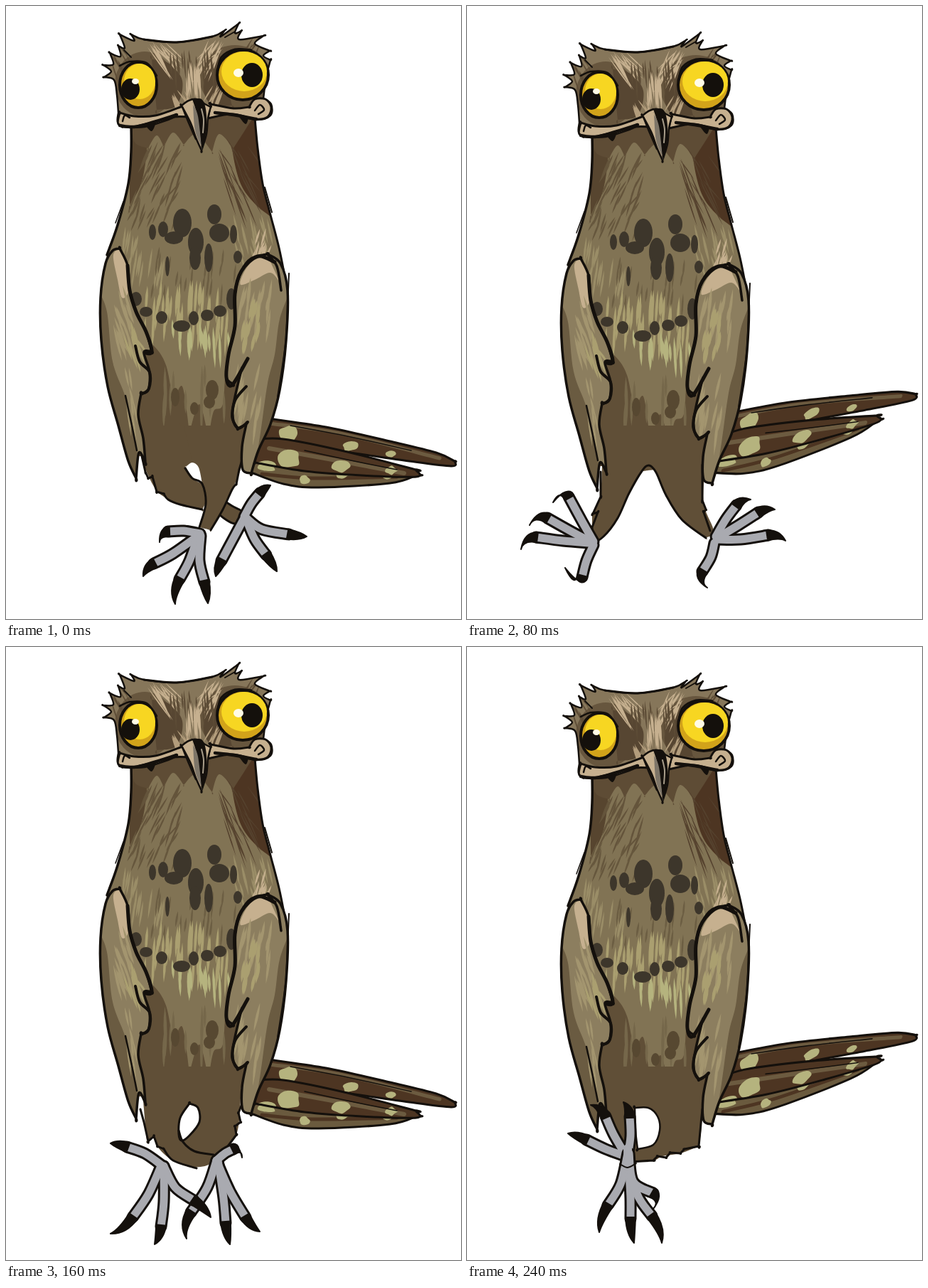
An HTML page that plays this animation: 640x862 px, repeating every 0.32 s.

```html
<!DOCTYPE html>
<html lang="en">
<head>
<meta charset="utf-8">
<title>Dancing potoo</title>
<style>
html, body { margin: 0; width: 100%; height: 100%; overflow: hidden; background: #fff; }
svg { display: block; width: 100vw; height: 100vh; }
</style>
</head>
<body>
<svg id="stage" viewBox="0 0 640 862" stroke-linecap="round" stroke-linejoin="round"></svg>
<script>
const INK = '#14100c', DARK = '#604f37', MID = '#817354', WING = '#8c7e5f',
      KHAKI = '#aa9f70', TAN = '#c6b08f', SPOT = '#3d362b', BROWN = '#4d3522',
      PALE = '#b5b37e', CLAW = '#a9aab0';

let seed = 7;
const rnd = () => (seed = seed * 16807 % 2147483647) / 2147483647;
const f = n => n.toFixed(1);

// Smooth curve through points; "!" marks a sharp corner.
function curve(text, closed) {
  const p = text.trim().split(/\s+/).flatMap(s => {
    const q = s.replace('!', '').split(',').map(Number);
    return s.endsWith('!') ? [q, q] : [q];
  });
  const n = p.length;
  const at = i => closed ? p[(i + n) % n] : p[Math.max(0, Math.min(n - 1, i))];
  let d = `M${p[0]}`;
  for (let i = 0; i < (closed ? n : n - 1); i++) {
    const [a, b, c, e] = [at(i - 1), at(i), at(i + 1), at(i + 2)];
    d += 'C' + [0, 1].map(k => f(b[k] + (c[k] - a[k]) / 6)) + ' ' +
         [0, 1].map(k => f(c[k] - (e[k] - b[k]) / 6)) + ' ' + c;
  }
  return d + (closed ? 'Z' : '');
}
const shape = (pts, fill, w = 0) =>
  `<path d="${curve(pts, true)}" fill="${fill}" stroke="${w ? INK : 'none'}" stroke-width="${w}"/>`;
const line = (pts, w = 3, color = INK) =>
  `<path d="${curve(pts)}" fill="none" stroke="${color}" stroke-width="${w}"/>`;
const oval = (x, y, rx, ry, fill, w = 0) =>
  `<ellipse cx="${x}" cy="${y}" rx="${rx}" ry="${ry}" fill="${fill}" stroke="${w ? INK : 'none'}" stroke-width="${w}"/>`;
const group = (id, inner) => `<g id="${id}">${inner}</g>`;

// Filled shape whose inner markings are clipped to its edge.
function part(id, pts, fill, inner, w) {
  const d = curve(pts, true);
  return `<clipPath id="${id}"><path d="${d}"/></clipPath><path d="${d}" fill="${fill}"/>
    <g clip-path="url(#${id})">${inner}</g>
    ${w ? `<path d="${d}" fill="none" stroke="${INK}" stroke-width="${w}"/>` : ''}`;
}

// Leaf-shaped feather strokes scattered in a box.
function streaks(n, x, y, w, h, len, lean, width, fill) {
  let d = '';
  for (let i = 0; i < n; i++) {
    const l = len * (0.6 + rnd() * 0.7), s = lean * (0.7 + rnd() * 0.6);
    d += `M${f(x + rnd() * w)} ${f(y + rnd() * h)}q${f(s / 2 + width)} ${f(l / 2)} ${f(s)} ${f(l)}` +
         `q${f(-s / 2 - width)} ${f(-l / 2)} ${f(-s)} ${f(-l)}`;
  }
  return `<path d="${d}" fill="${fill}"/>`;
}

function blotch(x, y, w, h, fill = PALE) {
  const pts = [];
  for (let i = 0; i < 9; i++) {
    const a = i * Math.PI / 4.5, r = 0.75 + rnd() * 0.4;
    pts.push(f(x + Math.cos(a) * w * r) + ',' + f(y + Math.sin(a) * h * r));
  }
  return shape(pts.join(' '), fill);
}
const blotches = list => list.map(b => blotch(...b)).join('');
const ovals = list => list.map(b => oval(...b, SPOT)).join('');

// Each toe runs from the ankle to its end; the last point is the claw tip.
function foot(...toes) {
  let edge = '', skin = '', claws = '';
  for (const toe of toes) {
    const p = toe.split(' '), tip = p.pop().split(',').map(Number);
    const [a, e] = p.slice(-2).map(s => s.split(',').map(Number));
    const len = Math.hypot(e[0] - a[0], e[1] - a[1]);
    const u = [(e[0] - a[0]) / len, (e[1] - a[1]) / len];
    const reach = Math.hypot(tip[0] - e[0], tip[1] - e[1]) * 0.65;
    const side = (r, k) => f(e[0] + u[0] * r - u[1] * k) + ' ' + f(e[1] + u[1] * r + u[0] * k);
    edge += line(p.join(' '), 17);
    skin += line(p.join(' '), 11, CLAW);
    claws += `<path d="M${side(-2, 7)}Q${side(reach, 6)} ${tip}Q${side(reach, -6)} ${side(-2, -7)}Z" fill="${INK}" stroke="${INK}" stroke-width="2"/>`;
  }
  return edge + skin + claws;
}

const tail =
  part('low', '340,640! 400,645 480,655 577,660! 540,671 440,677 390,672 345,656!', '#6a5a3e',
    line('360,658 430,664 550,662', 5, BROWN) +
    blotches([[367, 648, 13, 7], [420, 666, 8, 6], [472, 658, 10, 6], [535, 660, 8, 5]]), 3) +
  part('top', '350,575! 370,580 450,592 540,612 605,628 631,640! 626,647 560,639 470,626 360,612!', BROWN,
    line('370,587 470,601 610,636', 5, '#6c5b40') +
    blotches([[398, 601, 13, 13], [484, 619, 12, 7], [541, 630, 8, 5]]), 3) +
  part('centre', '350,610! 390,609 480,627 576,652! 577,662 500,660 420,654 350,642!', BROWN,
    line('370,622 470,640 560,657', 6, '#6c5b40') +
    blotches([[398, 636, 16, 13], [470, 647, 13, 9], [541, 653, 9, 6], [366, 648, 14, 8]]), 3) +
  line('400,590 480,605 570,625', 1.5) + line('420,625 490,640 550,652', 1.5);

const torso = part('torso',
  '176,155! 176,200 172,250 157,308 142,350 140,420 165,520 190,590 195,630! 328,630! 340,590 370,520 393,430 392,380 384,340 371,290 361,250 354,200 350,150!',
  MID,
  shape('170,450! 205,475 225,505 235,560! 248,535 258,600! 272,560 285,608! 292,570 305,560 312,500 340,470! 345,640! 180,640!', DARK) +
  shape('174,150! 174,280! 190,250 198,205 200,150!', '#57452f') +
  shape('316,150! 318,200 330,250 352,280 378,300! 370,240 355,150!', BROWN) +
  shape('178,150! 180,190 200,200! 212,182 222,198! 235,178 250,195! 268,180 290,205! 300,180 320,200! 352,150!', '#5e4c35') +
  streaks(30, 200, 190, 50, 60, 32, -14, 3, '#64543b') +
  streaks(22, 295, 185, 45, 70, 48, 22, 2, '#55422e') +
  streaks(18, 180, 255, 70, 35, 28, -10, 3, '#66573d') +
  streaks(24, 165, 310, 60, 60, 36, -5, 3, '#9a8d67') +
  streaks(22, 310, 280, 60, 60, 36, 8, 3, '#9a8d67') +
  streaks(14, 350, 310, 25, 45, 26, -8, 3, TAN) +
  streaks(22, 205, 335, 120, 60, 32, -3, 3, '#6c5e43') +
  streaks(38, 195, 385, 120, 55, 46, -3, 4, KHAKI) +
  streaks(16, 225, 440, 90, 20, 44, 2, 4, PALE) +
  streaks(15, 220, 500, 90, 50, 50, 0, 4, '#75674a') +
  ovals([
    [248, 305, 13, 20], [236, 326, 13, 9], [267, 332, 11, 20], [293, 293, 10, 14],
    [300, 319, 14, 13], [285, 354, 6, 20], [266, 354, 8, 17], [320, 321, 5, 13],
    [326, 353, 6, 9], [221, 314, 7, 11], [206, 318, 5, 11], [227, 366, 3, 14],
    [183, 412, 8, 10], [197, 430, 9, 7], [219, 438, 8, 9], [247, 450, 12, 8],
    [264, 439, 7, 10], [283, 435, 9, 8], [301, 429, 9, 8], [317, 412, 7, 15]
  ]) +
  [[290, 540, 9, 14], [286, 557, 8, 9], [238, 550, 6, 13], [265, 566, 6, 9]]
    .map(o => oval(...o, '#574831')).join('')) +
  line('176,165 176,205 172,250 157,308 142,350', 3.5) +
  line('350,158 354,200 361,250 371,290 384,340 392,380', 3) +
  line('364,255 374,290', 2) + line('154,305 165,275', 1.5);

const wings =
  part('leftWing',
    '160,341! 171,365 174,400 183,430 197,458 205,486! 194,487 202,515 200,540 190,545! 186,575 193,608 196,642! 187,628 183,664! 172,640 158,590 143,535 134,470 133,410 140,362 150,344', WING,
    shape('130,400! 142,430 150,500 168,550 180,600 190,665! 150,660! 130,520!', '#6a5b41') +
    shape('151,350 163,344 171,372 172,402 163,410 157,385', TAN) +
    streaks(16, 150, 390, 22, 70, 40, 14, 4, '#a3956f') +
    streaks(10, 165, 440, 20, 35, 36, 12, 4, KHAKI) +
    streaks(8, 165, 505, 20, 60, 44, 6, 3, '#a3956f'), 3.5) +
  line('171,365 174,400 183,430 197,458 205,486 196,488', 5) +
  line('182,478 188,500 202,515 201,538 190,546', 4) +
  line('168,548 177,590 184,625', 2.5) +
  part('rightWing',
    '368,349! 345,355 331,373 322,405 322,450 313,490 310,522 320,532! 331,512! 322,550 318,578 326,594! 338,588! 332,620 333,652 345,657! 355,625 372,588 385,540 394,470 396,400 386,362', WING,
    shape('400,400! 385,440 378,490 368,530 358,600 350,650! 400,620!', '#6a5b41') +
    shape('368,351! 348,358 335,374 330,392 350,385 372,375 386,390!', TAN) +
    streaks(20, 330, 380, 45, 55, 40, -6, 4, '#a3956f') +
    streaks(14, 335, 410, 22, 55, 32, -4, 5, KHAKI) +
    streaks(12, 325, 500, 35, 60, 48, -8, 4, '#a3956f'), 3.5) +
  line('378,360 354,352 331,373 322,405 322,450 313,490 310,522 318,533 340,496', 5) +
  line('338,535 322,555 319,580 327,594 340,585', 4) +
  line('368,350 381,366 387,400', 3.5) +
  line('398,376 396,420 393,475 382,550', 2);

const eye = (x, y, rx, ry, px, py, pr, hx, hy, hr) =>
  oval(x, y, rx + 1, ry + 1, '#d2a31a', 4) +
  oval(x + 2, y - 5, rx - 3, ry - 6, '#f7d622') +
  oval(px, py, pr - 1, pr + 1, INK) + oval(hx, hy, hr + 1, hr, '#fffbe6');

const head =
  part('head',
    '158,150! 156,125 152,104 138,100! 148,92 137,83! 151,82 146,66! 161,71 158,56! 167,59 160,40! 180,49 176,40! 194,47 240,51 290,43 308,34! 302,43 327,25! 322,38 331,35! 328,47 362,42! 350,53 371,63! 362,70 372,76! 366,100 362,130! 373,138 372,154 352,160 320,153 288,150 270,160 250,152 228,160 195,170 165,170! 157,163',
    '#86765a',
    oval(195, 110, 42, 46, '#67563e') + oval(322, 101, 50, 46, '#67563e') +
    shape('205,75! 228,80 248,105 240,140 212,146!', '#574632') +
    shape('300,65! 283,90 278,118 290,140 318,140!', '#574632') +
    streaks(16, 195, 50, 35, 12, 36, 26, 2.5, TAN) +
    streaks(16, 285, 46, 24, 16, 38, -24, 2.5, TAN) +
    streaks(18, 225, 58, 75, 20, 34, 2, 2.5, '#5d4c36') +
    streaks(14, 250, 78, 24, 25, 40, 2, 2.5, TAN) +
    streaks(12, 228, 112, 24, 20, 30, 14, 2.5, '#b39d7c') +
    streaks(12, 284, 108, 24, 20, 32, -14, 2.5, '#b39d7c') +
    streaks(12, 146, 52, 24, 25, 28, 14, 2, '#5d4c36') +
    streaks(10, 335, 44, 28, 12, 20, -14, 2, '#5d4c36'), 2.5) +
  line('194,47 240,51 290,43', 3) + line('308,44 322,36', 2) + line('166,62 176,72', 2) +
  shape('160,150! 180,155 210,154 248,141! 259,156! 235,156 205,164 175,170 158,166', TAN, 3) +
  shape('288,138! 320,144 342,142! 350,131 365,131 373,142 368,156 350,159 318,152 284,158!', TAN, 3) +
  line('160,168 180,170 205,164 240,153', 4.5) + line('294,150 320,153 352,159', 4.5) +
  line('350,147 357,139 363,146 355,152', 2.5) + line('164,162 167,154 174,157', 2.5) +
  shape('196,168! 205,176 211,164!', INK) + shape('328,156! 337,166 341,158!', INK) +
  eye(186, 111, 25, 31, 175, 117, 14, 182, 106, 4) +
  eye(333, 97, 35, 34, 346, 97, 16, 327, 94, 6) +
  line('160,84 175,78 198,80 212,98', 2.5) + line('298,90 303,72 322,61 345,62', 3) +
  shape('247,140! 257,133 268,131 280,138 288,142! 284,158 282,180 275,203! 267,185 260,165', TAN, 2.5) +
  shape('262,131! 275,131 281,145 282,175 275,203! 272,175 268,150', INK) +
  shape('263,138! 270,155 275,198! 266,175', '#7d7568') +
  line('275,145 278,160 277,178', 2, '#a79c89') + line('248,142 256,162 267,187', 2.5);

const legs = [
  shape('298,690! 318,703 334,713 322,728 298,712', DARK, 3) +
  shape('190,590! 190,630 200,660 212,683! 225,692 240,700 276,708! 290,680 300,640 300,590!', DARK) +
  line('188,620 196,655! 200,664! 206,662! 212,683! 222,686! 228,694 245,701 276,708') +
  shape('331,590! 332,640 322,672 305,708 288,737! 272,733! 281,700 277,675 264,645 250,590!', DARK) +
  shape('253,648! 262,642 271,649 276,672! 262,664', '#fff') +
  line('252,650 262,664 276,672 281,700 272,733') +
  line('333,635 328,652! 324,672! 318,680 305,708 288,737'),

  shape('190,590! 190,645 187,690 176,714! 176,752! 190,748 212,720 228,685 246,654! 264,652! 278,685 302,722 336,748! 347,738 333,700 334,650 332,590!', DARK) +
  line('188,655 188,690! 177,714! 184,712! 176,733! 178,752 192,746 212,720 228,685 246,654 256,646 266,656 280,688 302,722 336,748') +
  line('331,645 331,695! 336,708! 333,712! 342,738'),

  shape('190,590! 194,650 198,694! 208,688! 215,705 235,722 264,732! 285,728 300,712 322,690 329,655 331,590!', DARK) +
  shape('258,642! 270,648 272,668 258,687 247,694 243,685 245,662', '#fff', 3) +
  line('243,680 249,696 265,709 292,714') +
  line('189,650 194,668! 200,695! 208,688! 213,702! 222,706! 235,722 268,733') +
  line('333,640 327,655! 330,668! 322,674! 324,686! 312,702'),

  shape('190,590! 196,660 205,690 230,724! 262,722 275,716 300,712 326,702! 330,670 331,590!', DARK) +
  shape('236,648! 255,648 268,660 271,680 262,700 240,706! 237,680', '#fff', 2.5) +
  line('230,724 262,722! 268,716! 280,718! 286,711! 300,712! 306,706! 326,702! 329,670 331,650')
];

const feet = [
  foot('335,718 345,700 357,685 372,674', '338,720 360,736 398,743 423,746',
       '338,722 350,750 366,772 381,795', '334,722 318,752 303,780 295,802') +
  foot('273,742 250,738 228,739 216,754', '270,745 235,770 208,784 193,802',
       '270,745 258,780 244,806 238,841', '274,745 272,780 279,810 284,840'),

  foot('178,753 162,725 143,690 121,698', '175,754 145,738 113,720 88,730',
       '172,755 135,752 97,747 76,764', '178,758 168,780 162,803 138,790') +
  foot('350,746 364,722 379,702 399,694', '352,748 382,730 410,712 433,708',
       '352,750 385,750 424,744 448,752', '348,755 343,775 331,795 338,818'),

  foot('296,722 308,712 320,706 332,718', '296,722 315,765 337,802 357,822',
       '298,722 306,775 309,810 315,840', '296,722 283,760 260,795 254,832') +
  foot('218,728 195,712 170,703 147,698', '218,730 200,770 178,802 147,825',
       '222,730 222,780 218,815 209,840', '222,730 238,760 264,778 288,802'),

  foot('224,716 206,685 195,660 174,644', '226,716 230,688 229,660 220,640',
       '222,716 195,706 168,693 142,684') +
  foot('226,712 216,755 198,785 186,823', '228,712 234,752 262,768 262,790',
       '228,740 230,775 230,804 235,838', '228,740 242,775 260,800 274,838') +
  line('226,705 227,735', 12, CLAW) + line('215,727 226,732 238,726', 2)
];

const stage = document.getElementById('stage');
stage.innerHTML = group('tail', tail) + group('torsoBox', torso) +
  legs.map((s, i) => group('legs' + i, s)).join('') +
  group('upper', wings + head) +
  feet.map((s, i) => group('feet' + i, s)).join('');

const get = id => document.getElementById(id);
const STEP = 80, bob = [0, 14, -1, 14];
let last = -1;

function draw(ms) {
  const pose = Math.floor(ms / STEP) % 4;
  if (pose === last) return;
  last = pose;
  const shift = `translate(0 ${bob[pose]})`;
  get('torsoBox').setAttribute('transform', shift);
  get('upper').setAttribute('transform', shift);
  // Every other beat the tail flicks up from its root.
  get('tail').setAttribute('transform', pose % 2 ? 'matrix(1 -.33 0 1 0 114)' : '');
  for (let i = 0; i < 4; i++) {
    const show = i === pose ? 'inline' : 'none';
    get('legs' + i).style.display = show;
    get('feet' + i).style.display = show;
  }
}

const start = performance.now();
function tick() {
  draw(performance.now() - start);
  requestAnimationFrame(tick);
}
tick();
</script>
</body>
</html>
```
